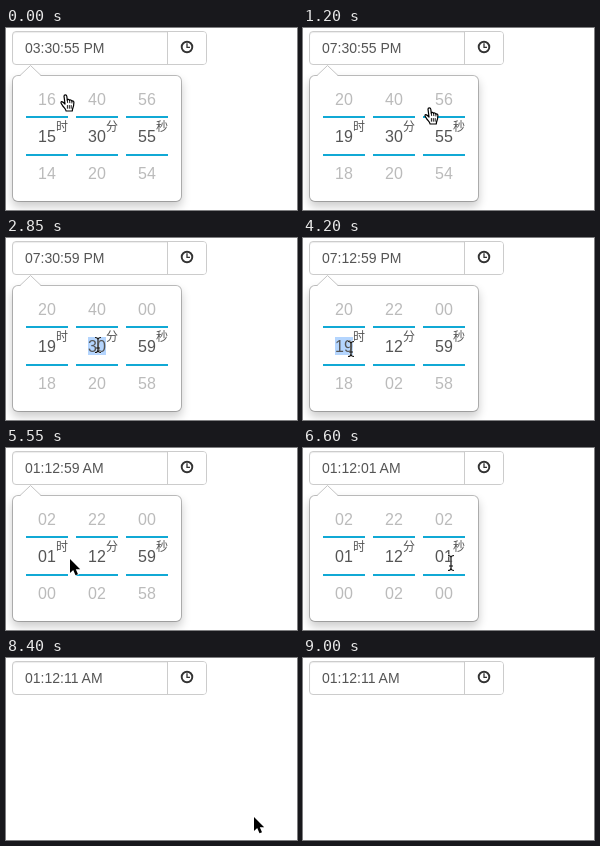
These frames come from a looping animation (291x182 px, 9150 ms). An HTML page:

```html
<!DOCTYPE html>
<html lang="en">
<head>
<meta charset="utf-8">
<title>Time picker</title>
<style>
  html, body { margin: 0; width: 100%; height: 100%; overflow: hidden; background: #fff; }
  #stage { position: relative; width: 291px; height: 182px; overflow: hidden; background: #fff; }
  #stage div { box-sizing: border-box; position: absolute; }
  #field { left: 6px; top: 3px; width: 195px; height: 34px; border: 1px solid #ccc; border-radius: 4px;
    box-shadow: inset 0 1px 1px rgba(0,0,0,.075); }
  #button { left: 154px; top: 0; width: 39px; height: 32px; border-left: 1px solid #ccc;
    border-radius: 0 3px 3px 0; background: #fff; }
  #panel { left: 6px; top: 47px; width: 170px; height: 127px; border: 1px solid rgba(0,0,0,.25);
    border-radius: 6px; background: #fff; background-clip: padding-box; box-shadow: 0 5px 10px rgba(0,0,0,.2); }
  svg { position: absolute; left: 0; top: 0; }
  text { font-family: "Liberation Sans", Arial, sans-serif; fill: #555; }
  .num { font-size: 16px; text-anchor: middle; }
  .dim { fill: #bbb; }
  .unit { font: 12px "Noto Sans CJK SC", "Noto Sans CJK", sans-serif; }
</style>
</head>
<body>
<div id="stage">
  <div id="field"><div id="button"></div></div>
  <div id="panel"></div>
  <svg width="291" height="182" viewBox="0 0 291 182">
    <text id="time" x="19" y="25" font-size="14"></text>
    <g fill="none" stroke="#333">
      <circle cx="181" cy="19" r="5.3" stroke-width="1.9"/>
      <path d="M181 15.3V19.3H184" stroke-width="1.3"/>
    </g>
    <g id="wheels">
      <path d="M14 48L24.5 37.5L35 48Z" fill="#fff"/>
      <path d="M14 47.5L24.5 37.5L35 47.5" fill="none" stroke="#c4c4c4"/>
    </g>
    <g id="hand" stroke="#000" stroke-linejoin="round" stroke-linecap="round">
      <path transform="translate(-5 -1)" fill="#fff" stroke-width="1.2" d="M4 2.2C4 .4 6.6 .4 6.8 2.2L7.3 6.2C7.6 5 9.3 5.1 9.6 6.5C10 5.6 11.6 5.9 11.9 7.2C12.6 6.6 13.9 7 13.9 8.4L13.6 11.5C13.3 13.5 12.4 14.2 12.3 17H6.1C6 15 3.6 13.5 2.6 11.6C2 10.3 .6 9.2 1 8.2C1.4 7.2 3 7.6 5 10Z"/>
      <path transform="translate(-5 -1)" fill="none" stroke-width=".9" d="M7.3 6.2L7.6 8.5M9.6 6.5L9.8 8.7M11.9 7.2V9M7.4 11.5V14.3M9.3 11.5V14.3M11.2 11.5V14.3"/>
    </g>
    <path id="arrow" d="M0 0V14L3.2 11.1L5.5 16.3L8 15.2L5.8 10.2H10.2Z" stroke="#fff" stroke-width="1.2" paint-order="stroke"/>
    <g id="beam" fill="none">
      <path d="M-3 -7.5Q0 -7.5 0 -5V5Q0 7.5 -3 7.5M3 -7.5Q0 -7.5 0 -5M3 7.5Q0 7.5 0 5M-2 3H2" stroke="#fff" stroke-width="2.4" opacity=".6"/>
      <path d="M-3 -7.5Q0 -7.5 0 -5V5Q0 7.5 -3 7.5M3 -7.5Q0 -7.5 0 -5M3 7.5Q0 7.5 0 5M-2 3H2" stroke="#111" stroke-width="1.2"/>
    </g>
  </svg>
</div>
<script>
const LOOP = 9150;
const $ = id => document.getElementById(id);
const pad = n => String(n).padStart(2, "0");

const wheels = [
  { key: "h", x: 41, unit: "时", step: 1, size: 24 },
  { key: "m", x: 91, unit: "分", step: 10, size: 60 },
  { key: "s", x: 141, unit: "秒", step: 1, size: 60 }
];

// Values: each entry holds until the next one for the same key.
const values = [
  [0, { h: 15, m: 30, s: 55, sel: "", open: true }],
  [150, { h: 16 }], [450, { h: 17 }], [750, { h: 18 }], [1050, { h: 19 }],
  [1500, { s: 56 }], [1800, { s: 57 }], [2100, { s: 58 }], [2400, { s: 59 }],
  [2850, { sel: "m" }], [3150, { m: 1, sel: "" }], [3300, { m: 12 }],
  [4200, { sel: "h" }], [4950, { h: 0, sel: "" }], [5250, { h: 1 }],
  [6000, { sel: "s" }], [6600, { s: 1, sel: "" }], [7050, { s: 11 }],
  [8250, { open: false }]
];

// Pointer: time, shape, x, y of its hot spot.
const pointer = [
  [0, "hand", 59, 67], [300, "hand", 60, 67],
  [1050, "hand", 78, 73], [1200, "hand", 126, 80], [1350, "hand", 140, 76],
  [1500, "hand", 147, 70], [1650, "hand", 148, 69],
  [2250, "hand", 147, 69], [2550, "hand", 138, 76], [2700, "beam", 104, 107], [2850, "beam", 92, 107],
  [3750, "beam", 84, 117], [3900, "arrow", 64, 116], [4050, "beam", 53, 113], [4200, "beam", 48, 111],
  [5550, "arrow", 64, 111], [5700, "beam", 100, 107], [5850, "beam", 134, 111], [6000, "beam", 148, 115],
  [7500, "arrow", 174, 100], [7650, "arrow", 218, 134], [7800, "arrow", 245, 161],
  [8100, "arrow", 245, 155], [8250, "arrow", 246, 156], [8400, "arrow", 248, 159],
  [8550, "arrow", 250, 163], [8700, "arrow", 251, 169], [8850, "arrow", 251, 177], [9000, "", 0, 0]
];

function add(tag, attrs, text = "") {
  const el = document.createElementNS("http://www.w3.org/2000/svg", tag);
  for (const k in attrs) el.setAttribute(k, attrs[k]);
  el.textContent = text;
  return $("wheels").appendChild(el);
}

for (const w of wheels) {
  w.mark = add("rect", { x: w.x - 9, y: 99, width: 18, height: 18, fill: "#b4d5fe" });
  for (const y of [88, 126])
    add("rect", { x: w.x - 21, y, width: 42, height: 2, fill: "#11a9d5" });
  w.rows = [1, 0, -1].map((d, i) =>
    add("text", { x: w.x, y: 77 + 37 * i, class: d ? "num dim" : "num" }));
  add("text", { x: w.x + 9, y: 103, class: "unit" }, w.unit);
}

function draw(t) {
  const v = Object.assign({}, ...values.filter(e => e[0] <= t).map(e => e[1]));
  $("time").textContent =
    `${pad(v.h % 12 || 12)}:${pad(v.m)}:${pad(v.s)} ${v.h < 12 ? "AM" : "PM"}`;
  $("panel").style.display = $("wheels").style.display = v.open ? "" : "none";

  for (const w of wheels) {
    w.mark.style.display = v.sel === w.key ? "" : "none";
    w.rows.forEach((row, i) => {
      row.textContent = pad((v[w.key] + (1 - i) * w.step + w.size) % w.size);
    });
  }

  const [, shape, x, y] = pointer.filter(p => p[0] <= t).pop();
  for (const id of ["hand", "arrow", "beam"]) {
    $(id).style.display = id === shape ? "" : "none";
    $(id).setAttribute("transform", `translate(${x} ${y})`);
  }
}

const start = performance.now();
function tick() {
  draw((performance.now() - start) % LOOP);
  requestAnimationFrame(tick);
}
tick();
</script>
</body>
</html>
```
